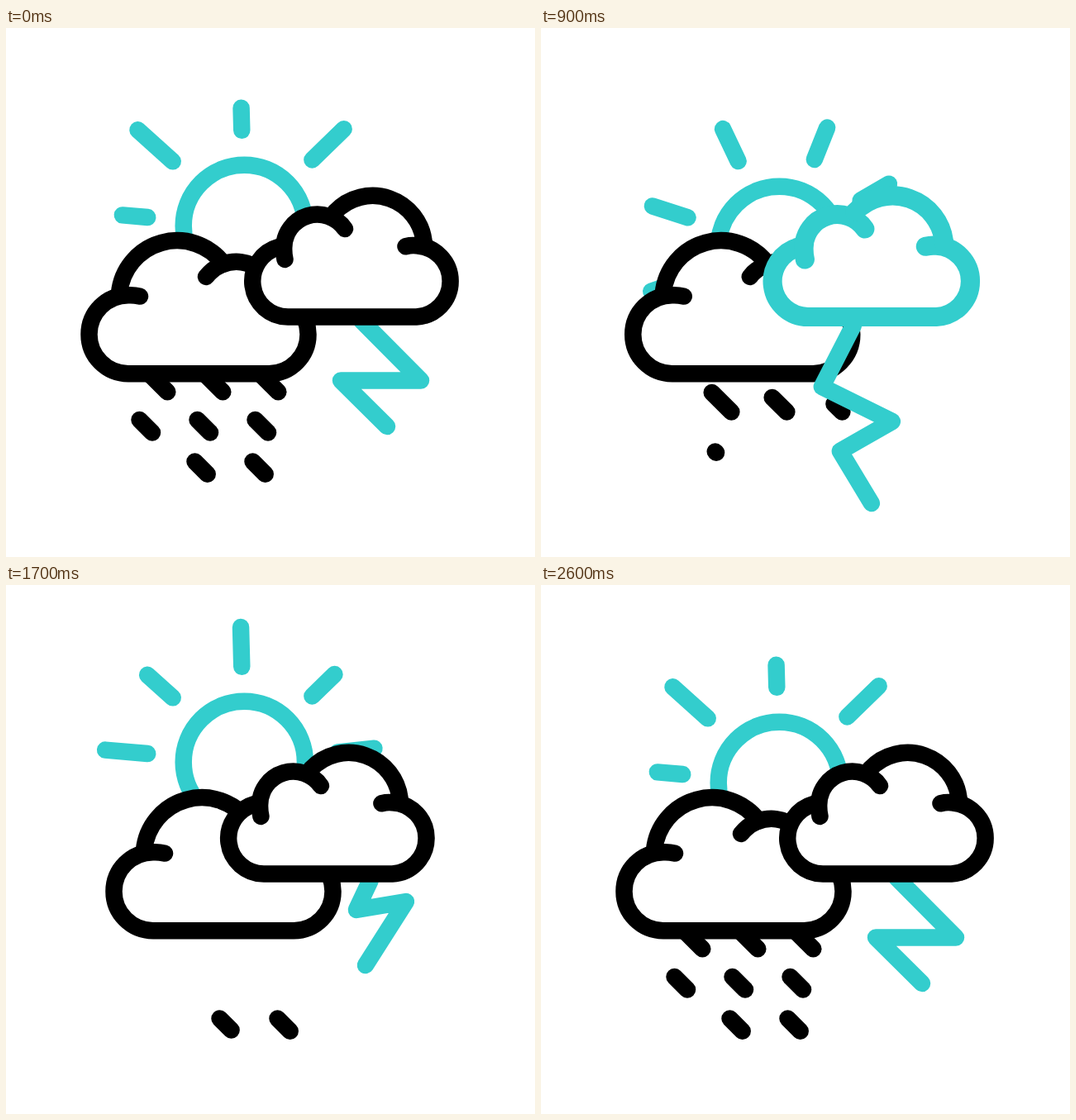
Recreate the animation shown at these times as an HTML page. Size 640 px wide and 640 px high, loop 3 s.

```html
<!DOCTYPE html>
<html lang="en">
<head>
<meta charset="utf-8">
<title>Stormy weather</title>
<style>
  html, body { margin: 0; width: 100%; height: 100%; overflow: hidden; background: #fff; }
  svg { display: block; width: 100%; height: 100%; }
  #scene {
    --teal: #33cdcd;
    fill: none;
    stroke: #000;
    stroke-width: 20.5;
    stroke-linecap: round;
    stroke-linejoin: round;
  }
  #sun, .bolt { stroke: var(--teal); }
  .body { fill: #fff; stroke: none; }
  #right.flash { stroke: var(--teal); stroke-width: 23.2; }
</style>
</head>
<body>
<svg viewBox="0 0 640 640">
  <g id="scene">
    <g id="sun">
      <circle r="73.6"/>
      <g id="rays"></g>
    </g>

    <g id="left">
      <g id="rain"></g>
      <path class="body" d="M148 418A47.5 47.5 0 0 1 137 323A70.3 70.3 0 0 1 263 285Q300 275 322 312A48 48 0 0 1 318 418Z"/>
      <path d="M162 324.6Q155 322.8 148 323.2A47.5 47.5 0 0 0 148 418.2H318A47.5 47.5 0 0 0 365.5 370.5Q365 335 322 312"/>
      <path d="M137 321A70.3 70.3 0 0 1 263.4 285.5"/>
      <path d="M242 301A46.5 46.5 0 0 1 322 312"/>
    </g>

    <g id="storm">
      <path class="bolt" d="M430 354L502 426.5H405L461 482"/>
      <path class="bolt" d="M396 360L358 434L443 476L380 512L418 575"/>
      <path class="bolt" d="M470 357L453 393L513 383L464 460"/>
      <g id="right">
        <path class="body" d="M341 349.5A43 43 0 0 1 330 265H336.2A40.5 40.5 0 0 1 402 234L398 222.6A62.5 62.5 0 0 1 505.8 260A43.2 43.2 0 0 1 496.5 349.5Z"/>
        <path d="M330 265A43 43 0 0 0 341 349.5H496.5A43.2 43.2 0 0 0 496.5 263.2Q490 262.6 483.5 264.2"/>
        <path d="M337.5 280Q336 273 336.2 266A40.5 40.5 0 0 1 410 243"/>
        <path d="M398 222.6A62.5 62.5 0 0 1 505.8 260"/>
      </g>
    </g>
  </g>
</svg>
<script>
  const LOOP = 3000;
  const $ = id => document.getElementById(id);
  const clamp = v => Math.max(0, Math.min(1, v));
  const ease = p => (p = clamp(p), p * p * (3 - 2 * p));
  const mix = (a, b, k) => a + (b - a) * k;
  const within = (t, from, to) => t >= from && t < to;

  // Eased move away from zero and back again.
  const swing = (t, size, out, far, back, home) =>
    size * (ease((t - out) / (far - out)) - ease((t - back) / (home - back)));

  function addLine(parent) {
    const line = document.createElementNS('http://www.w3.org/2000/svg', 'line');
    parent.appendChild(line);
    return line;
  }

  function setLine(line, x1, y1, x2, y2) {
    line.setAttribute('x1', x1);
    line.setAttribute('y1', y1);
    line.setAttribute('x2', x2);
    line.setAttribute('y2', y2);
  }

  const polar = (deg, r) => {
    const a = deg * Math.PI / 180;
    return [r * Math.sin(a), -r * Math.cos(a)];
  };

  // Degrees from straight up; the lower rays stay behind the clouds.
  const rays = [-85, -48, -1.5, 45.8, 84].map(angle => ({ angle, line: addLine($('rays')) }));

  // At rest every other ray is short; stretched, they are nearly alike.
  function drawRays(t) {
    const stretch = swing(t, 1, 200, 600, 1900, 2230)
      + swing(t, 0.25, 400, 540, 540, 900)
      + swing(t, 0.3, 1500, 1700, 1700, 1900);
    rays.forEach(({ angle, line }, i) => {
      const rest = i % 2 ? 12 : -16;
      const outer = 164 - 2.7 * i + rest * (1 - stretch);
      setLine(line, ...polar(angle, 117.5 - i), ...polar(angle, outer));
    });
  }

  const rows = [
    { x: 170, y: 415, gap: 67, size: 25.3 },
    { x: 161.5, y: 474, gap: 70, size: 15.5 },
    { x: 158.5, y: 524.5, gap: 70, size: 15.2 }
  ];

  // Lower rows and right-hand columns leave and come back first.
  const drops = [];
  rows.forEach(({ x, y, gap, size }, row) => {
    for (let col = row === 2 ? 1 : 0; col < 3; col++) {
      drops.push({
        x: x + gap * col, y, size,
        gone: 1205 - 240 * row - 75 * col,
        back: 2146 - 290 * row - 65 * col,
        line: addLine($('rain'))
      });
    }
  });

  function drawDrops(t) {
    const fall = 25 * ease((t - 200) / 780);
    for (const { x, y, size, gone, back, line } of drops) {
      let from = 0, to;
      if (t < gone) {
        to = size + fall;
        from = to - size * (1 - ease((t - gone + 360) / 360));
      } else {
        to = size * ease((t - back) / 240);
      }
      line.style.display = within(t, gone, back) ? 'none' : '';
      setLine(line, x + from, y + from, x + to + 0.01, y + to + 0.01);
    }
  }

  const bolts = document.querySelectorAll('.bolt');

  function draw(t) {
    const leftX = swing(t, 30, 358, 1700, 1839, 2575);
    const rightX = swing(t, -30, 178, 1445, 1620, 2391);
    const sunY = mix(0, 26, ease((t - 200) / 700)) - 51 * ease((t - 900) / 802) + 25 * ease((t - 1702) / 690);
    const spin = swing(t, -24, 200, 530, 1150, 1580) + swing(t, -24, 1700, 1960, 1960, 2350);

    $('sun').setAttribute('transform', `translate(288.3 ${239.3 + sunY})`);
    $('rays').setAttribute('transform', `rotate(${spin})`);
    $('left').setAttribute('transform', `translate(${leftX} 0)`);
    $('storm').setAttribute('transform', `translate(${rightX} 0)`);
    drawRays(t);
    drawDrops(t);

    const shape = within(t, 700, 1320) ? 1 : within(t, 1320, 2080) ? 2 : 0;
    bolts.forEach((bolt, i) => { bolt.style.display = i === shape ? '' : 'none'; });
    $('right').classList.toggle('flash', within(t, 700, 1300) || within(t, 1780, 2080));
  }

  const start = performance.now();
  function tick() {
    draw((performance.now() - start) % LOOP);
    requestAnimationFrame(tick);
  }
  tick();
</script>
</body>
</html>
```
